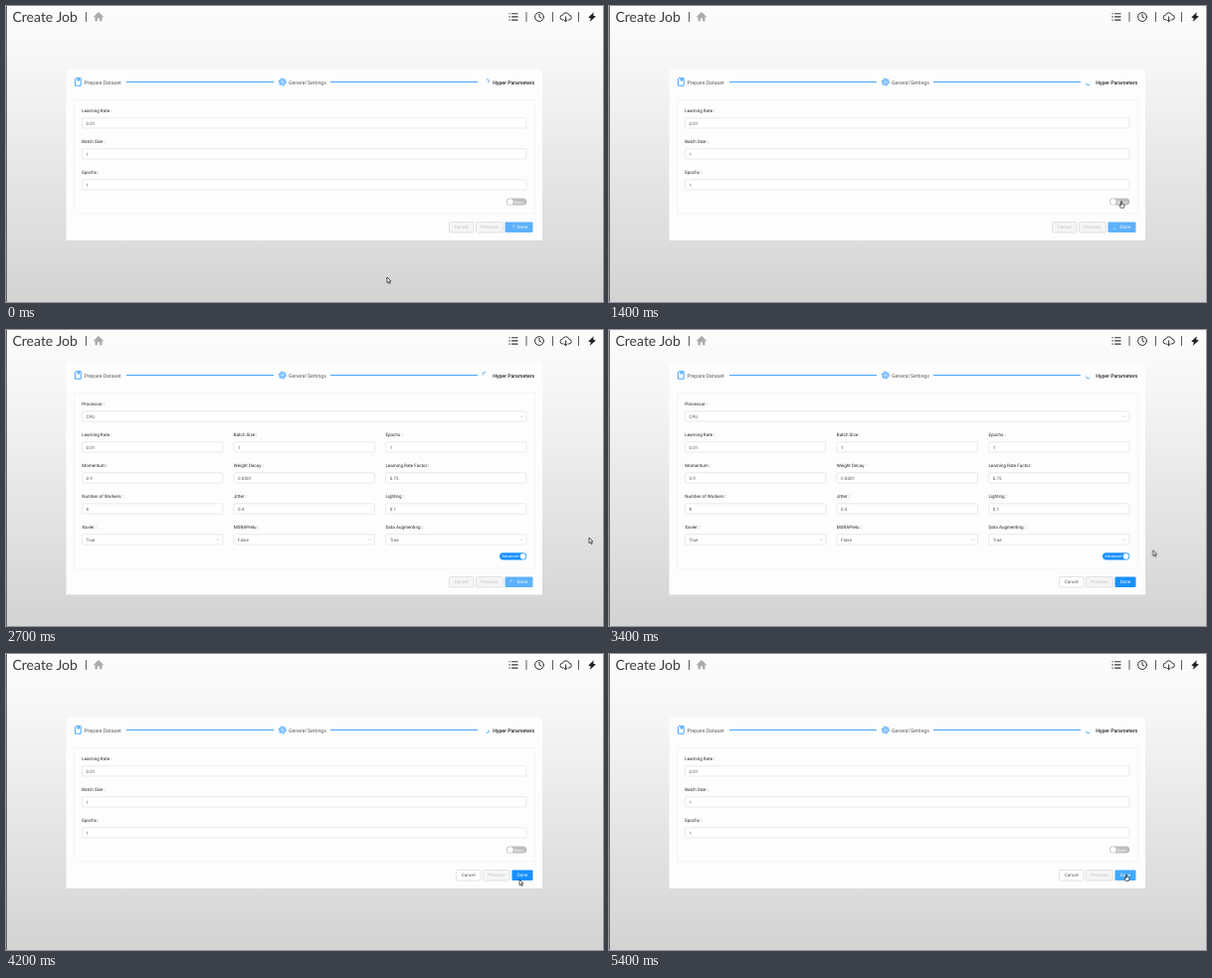
An HTML page for the animation above (5.5 s loop, 600 by 298 pixels).

```html
<!DOCTYPE html>
<html lang="en">
<head>
<meta charset="utf-8">
<title>Create Job</title>
<style>
  html, body { margin: 0; width: 100%; height: 100%; overflow: hidden; }
  svg { display: block; width: 100vw; height: 100vh; }
  text { font: 4.55px Roboto, sans-serif; fill: #595959; text-rendering: geometricPrecision; }
  .brand { font: 14px Lato, sans-serif; fill: #3c3c3c; }
  .label { fill: #262626; }
  .step { font-size: 5.2px; }
  .current { font-weight: 500; fill: #222; }
  .mid { text-anchor: middle; }
  .small { font-size: 3.9px; fill: #fff; }
  .off { fill: #bfbfbf; }
  .white { fill: #fff; }
  .line { fill: none; stroke: #333; stroke-linecap: round; stroke-linejoin: round; }
  .blue { fill: none; stroke: #1890ff; stroke-width: .8; stroke-linejoin: round; }
  .field { fill: #fff; stroke: #e4e4e4; stroke-width: .8; }

  .basic, .advanced, .head, .foot, .busy, .ready, .arrow, .hand, .cursor, .spin, .done {
    animation: 5.5s step-end -10ms infinite;
  }
  .basic { animation-name: basic; }
  .advanced { animation-name: advanced; }
  .head { animation-name: head; }
  .foot { animation-name: foot; }
  .busy { animation-name: busy; }
  .ready { animation-name: ready; }
  .arrow { animation-name: arrow; }
  .hand { animation-name: hand; }
  .done { animation-name: done; }
  .cursor { animation-name: move; }
  .spin { animation-name: spin; animation-timing-function: steps(55); }

  @keyframes basic { 0%, 76.36% { opacity: 1 } 29.09%, 76.35% { opacity: 0 } 100% { opacity: 1 } }
  @keyframes advanced { 0%, 76.36% { opacity: 0 } 29.09%, 76.35% { opacity: 1 } 100% { opacity: 0 } }
  @keyframes head { 0%, 76.36%, 100% { transform: none } 29.09% { transform: translateY(-31px) } }
  @keyframes foot { 0%, 76.36%, 100% { transform: none } 29.09% { transform: translateY(31px) } }
  @keyframes busy { 0% { opacity: 1 } 54.54%, 100% { opacity: 0 } }
  @keyframes ready { 0% { opacity: 0 } 54.54%, 100% { opacity: 1 } }
  @keyframes arrow { 0%, 29.09%, 76.36% { opacity: 1 } 20%, 69.09%, 89.09%, 100% { opacity: 0 } }
  @keyframes hand { 0%, 29.09%, 76.36% { opacity: 0 } 20%, 69.09%, 89.09%, 100% { opacity: 1 } }
  @keyframes done { 0% { fill: #1890ff } 89.09%, 100% { fill: #40a9ff } }
  @keyframes spin { from { transform: rotate(60deg) } to { transform: rotate(2040deg) } }
  @keyframes move {
    0% { transform: translate(383px, 273px); animation-timing-function: steps(6) }
    10.909% { transform: translate(541px, 220px); animation-timing-function: steps(5) }
    20% { transform: translate(515px, 195.5px); animation-timing-function: steps(5) }
    29.09% { transform: translate(515px, 197.5px) }
    34.545% { transform: translate(515px, 197.5px); animation-timing-function: steps(5) }
    43.636% { transform: translate(567px, 206px); animation-timing-function: steps(3) }
    49.09% { transform: translate(586px, 209px); animation-timing-function: steps(1) }
    50.909% { transform: translate(590px, 209.5px); animation-timing-function: steps(2) }
    54.545% { transform: translate(580px, 213px); animation-timing-function: steps(6) }
    65.454% { transform: translate(530px, 226px); animation-timing-function: steps(2) }
    69.09% { transform: translate(516px, 227px) }
    76.36% { transform: translate(516px, 227px); animation-timing-function: steps(4) }
    83.636% { transform: translate(517px, 209.5px); animation-timing-function: steps(5) }
    92.727% { transform: translate(520px, 222px) }
    100% { transform: translate(520px, 222px) }
  }
</style>
</head>
<body>
<svg viewBox="0 0 600 298" preserveAspectRatio="none">
  <defs>
    <linearGradient id="sky" x2="0" y2="1">
      <stop stop-color="#fcfcfd"/>
      <stop offset=".2" stop-color="#f6f6f7"/>
      <stop offset="1" stop-color="#d3d3d4"/>
    </linearGradient>
  </defs>
  <rect width="600" height="298" fill="url(#sky)"/>
  <rect width="1" height="298" fill="#666"/>

  <text class="brand" x="6.5" y="15.5">Create Job</text>
  <path class="line" stroke-width=".8" d="M80.5 6.5v9M523 6.5v9M549.5 6.5v9M575.5 6.5v9"/>
  <path fill="#aaa" d="M93 6l5 4.7-.7.7-.8-.7v4.5h-2.4v-3h-2.2v3h-2.4v-4.5l-.8.7-.7-.7z"/>
  <path class="line" stroke-width="1.1" d="M505.9 7.7h.4M505.9 10.9h.4M505.9 14.1h.4M508.5 7.7h5.6M508.5 10.9h5.6M508.5 14.1h5.6"/>
  <g class="line">
    <circle cx="536" cy="11" r="4.4"/>
    <path d="M536 8.3v2.8l1.9 1"/>
    <path d="M560 14h-.5a2.4 2.4 0 0 1-.1-4.8 3.4 3.4 0 0 1 6.5 0 2.4 2.4 0 0 1-.1 4.8h-.5M562.6 10.8v4.8M561.1 14.2l1.5 1.5 1.5-1.5"/>
  </g>
  <path fill="#222" d="M590.8 6.3l-5.6 5.2 2.6 1.1-1.2 3.3 6.2-5.4-2.7-1z"/>

  <g class="basic" id="basic">
    <rect x="60.5" y="64" width="478.5" height="172" fill="#fdfdfd"/>
    <rect x="68.5" y="94.5" width="463" height="114.5" fill="none" stroke="#f5f5f5"/>
    <rect x="503" y="193.5" width="20.3" height="7.1" rx="3.55" fill="#bfbfbf"/>
    <circle class="white" cx="506.8" cy="197.05" r="2.9"/>
    <text class="small mid" x="515.8" y="198.5">Basic</text>
  </g>
  <g class="advanced" id="advanced">
    <rect x="60.5" y="33" width="478.5" height="233.5" fill="#fdfdfd"/>
    <rect x="68.5" y="63.5" width="463" height="176.5" fill="none" stroke="#f5f5f5"/>
    <rect x="496" y="224.3" width="27.3" height="7.1" rx="3.55" fill="#1890ff"/>
    <circle class="white" cx="519.6" cy="227.85" r="2.9"/>
    <text class="small" x="498.3" y="229.3">Advanced</text>
  </g>

  <g class="head">
    <path class="blue" d="M70.2 72.7h5v7.5h-5.8v-6.7zM72 72.7v2.3h1.6v-2.3"/>
    <text class="step" x="78.5" y="78.6">Prepare Dataset</text>
    <path class="blue" d="M121 76.5h148M326 76.5h148"/>
    <circle class="blue" cx="277.8" cy="76.5" r="1.4"/>
    <circle class="blue" cx="277.8" cy="76.5" r="2.9"/>
    <circle class="blue" cx="277.8" cy="76.5" r="3.6" stroke-dasharray="1.4 2.37"/>
    <text class="step" x="284" y="78.6">General Settings</text>
    <g transform="translate(482.2 76.5)"><path class="blue spin" d="M-2.3-2.3A3.25 3.25 0 0 1 2.3-2.3"/></g>
    <text class="step current" x="489.2" y="78.6">Hyper Parameters</text>
  </g>

  <g class="foot">
    <g class="busy" id="busy">
      <rect x="501.5" y="217.5" width="28" height="10.5" rx="1" fill="#5db1fb"/>
      <g transform="translate(508.7 222.7)"><path class="spin" fill="none" stroke="#fff" stroke-width=".6" d="M-1.4-1.4A2 2 0 0 1 1.4-1.4"/></g>
      <text class="mid white" x="518.8" y="224.4">Done</text>
    </g>
    <g class="ready" id="ready">
      <rect class="done" x="508.5" y="217.5" width="21" height="10.5" rx="1" fill="#1890ff"/>
      <text class="mid white" x="519" y="224.4">Done</text>
    </g>
  </g>

  <g class="cursor">
    <path class="arrow" d="M0 0v5.6l1.3-1.1 1 2 .9-.4-1-2 1.7-.1z" fill="#fff" stroke="#222" stroke-width=".75"/>
    <path class="hand" d="M-.5.2q.6-.6 1.1 0v2.2l2 .6q.6.3.4 1.1l-.6 2.3h-3l-1.6-2.2q0-.8.8-.6l.9.5z" fill="#fff" stroke="#222" stroke-width=".75"/>
  </g>
</svg>
<script>
  const put = (id, html) => document.getElementById(id).insertAdjacentHTML('beforeend', html);

  const field = (label, value, x, y, w, select) => `
    <text class="label" x="${x - .3}" y="${y - 11.4}">${label} :</text>
    <rect class="field" x="${x}" y="${y - 5.2}" width="${w}" height="10.2" rx="1.2"/>
    <text x="${x + 4}" y="${y + 1.6}">${value}</text>
    ${select ? `<path d="M${x + w - 6.3} ${y - .7}l1.4 1.4 1.4-1.4" fill="none" stroke="#bbb" stroke-width=".6"/>` : ''}`;

  const button = (label, x, w, active) => `
    <rect x="${x}" y="217.5" width="${w}" height="10.5" rx="1" fill="${active ? '#fff' : '#f5f5f5'}" stroke="#dcdcdc" stroke-width=".8"/>
    <text class="mid ${active ? '' : 'off'}" x="${x + w / 2}" y="224.4">${label}</text>`;

  const basics = [['Learning Rate', '0.01'], ['Batch Size', '1'], ['Epochs', '1']];
  const extras = [
    ['Momentum', '0.9'], ['Weight Decay', '0.0001'], ['Learning Rate Factor', '0.75'],
    ['Number of Workers', '8'], ['Jitter', '0.4'], ['Lighting', '0.1'],
    ['Xavier', 'True', 1], ['MSRAPrelu', 'False', 1], ['Data Augmenting', 'True', 1]
  ];

  put('basic', basics.map(([label, value], i) => field(label, value, 76.5, 118 + 31 * i, 446.5)).join(''));
  put('advanced', field('Processor', 'CPU', 76.5, 87, 446.5, true) +
    [...basics, ...extras].map(([label, value, select], i) =>
      field(label, value, 76.5 + 152.6 * (i % 3), 118 + 31 * Math.floor(i / 3), 141.3, select)).join(''));
  put('busy', button('Cancel', 445.5, 24.5) + button('Previous', 472.5, 27));
  put('ready', button('Cancel', 452.5, 24.5, true) + button('Previous', 479.3, 27));
</script>
</body>
</html>
```
